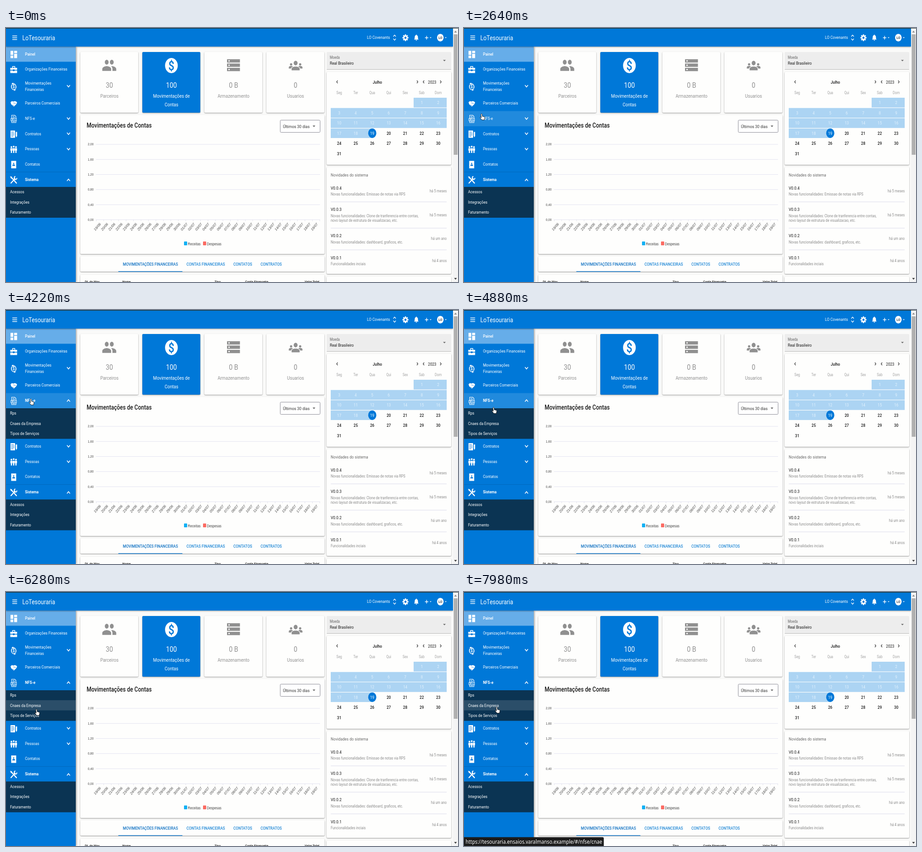
These frames come from a looping animation (998x561 px, 8 s). An HTML page:

```html
<!DOCTYPE html>
<html lang="pt-BR">
<head>
<meta charset="utf-8">
<title>Painel</title>
<style>
  html, body { margin: 0; width: 100%; height: 100%; overflow: hidden; background: #fafafa; }
  svg { display: block; width: 100%; height: 100%; }
  text { font-family: Roboto, sans-serif; white-space: pre; }
  .card { fill: #fefefd; filter: drop-shadow(0 1px 1.3px rgba(0, 0, 0, .42)); }
  .line { fill: none; stroke-linecap: round; stroke-linejoin: round; }
</style>
</head>
<body>
<svg id="stage" viewBox="0 0 998 561" preserveAspectRatio="none"></svg>
<script>
const SX = 0.86;            // the whole page is shown slightly narrowed
const LOOP = 8000;
const BLUE = '#0078d8', NAVY = '#0b3453', RANGE = '#acd4f3', GREY = '#909090', INK = '#161616';
const SIDE = 154, PANEL = 67.5;

// ---------- drawing helpers ----------
const rect = (x, y, w, h, fill, extra = '') =>
  `<rect x="${x}" y="${y}" width="${w}" height="${h}" fill="${fill}" ${extra}/>`;
const card = (x, y, w, h, extra = '') =>
  `<rect class="card" x="${x}" y="${y}" width="${w}" height="${h}" rx="2" ${extra}/>`;
const path = (d, fill = '#fff', extra = '') => `<path d="${d}" fill="${fill}" ${extra}/>`;
const line = (d, color = '#fff', w = 1.5) =>
  `<path class="line" d="${d}" stroke="${color}" stroke-width="${w}"/>`;
const oval = (x, y, rx, ry, fill) => `<ellipse cx="${x}" cy="${y}" rx="${rx}" ry="${ry}" fill="${fill}"/>`;
const at = (x, y, body, extra = '') => `<g transform="translate(${x} ${y}) ${extra}">${body}</g>`;

// text whose capitals are centred on y
function text(x, y, str, size, color = INK, { anchor = 'start', weight = 400, turn = 0, font = '', id = '' } = {}) {
  return `<text ${id && `id="${id}"`} transform="translate(${x} ${y}) scale(${SX} 1) rotate(${turn})" y="${size * 0.36}"` +
    ` font-size="${size}" font-weight="${weight}" fill="${color}" text-anchor="${anchor}"` +
    `${font && ` style="font-family:${font}"`}>${str}</text>`;
}
const mid = (x, y, str, size, color, weight = 400) => text(x, y, str, size, color, { anchor: 'middle', weight });
const end = (x, y, str, size, color, weight = 400) => text(x, y, str, size, color, { anchor: 'end', weight });
const caret = (x, y, color, r = 3) => path(`M${x - r} ${y - r / 2}h${2 * r}l${-r} ${r}z`, color);
const angle = (x, y, dir) => line(`M${x - dir} ${y - 2.6}l${2 * dir} 2.6 ${-2 * dir} 2.6`, INK, 1.2);
const chevron = (y, up) => line(up ? `M135 ${y + 2}l3-4 3 4` : `M135 ${y - 2}l3 4 3-4`);
const person = (x, y, s, fill) => at(x, y,
  oval(0, -5, 3, 3, fill) + path('M-6 6v-3c0-5 12-5 12 0v3z', fill), `scale(${s})`);

// ---------- sidebar icons, centred on 0,0 ----------
const icons = {
  board: path('M-7-8h6v9h-6zM-7 2.5h6v5.5h-6zM1-8h6.5v5h-6.5zM1-1.5h6.5v9.5h-6.5z'),
  brief: path('M-7.5-4h15v4.5h-5.5v-1h-4v1h-5.5zM-7.5 2h5.5v1.2h4v-1.2h5.5v5.5h-15z') +
    line('M-2.5-4.5v-2.5h5v2.5'),
  coin: line('M-1-6.5a6 7 0 0 1 5 11M1 7a6 7 0 0 1-5-11') +
    path('M-1-9v5l-4-2.5zM1 4.5v5l4-2.5z') + mid(0, 0, '$', 10, '#fff', 700),
  hands: path('M-7-3l3-2.5 3.5 1 2-1 3.500.5 2.500 2.500-1.500 4-2.500 2-3 3-2.500-2-3.500-3z') +
    line('M-1-2l2 1.5 2-1 3 3M-2 3l2 1.5', BLUE, .8),
  invoice: line('M-4.5-1v-7h6.500l3 3v4M-6-1h12v5.500h-12zM-4.500 4.500v4h9.500v-4M-2-5.500h3M-2-3.300h4.500M-2 6.500h4.500', '#fff', 1.1) +
    mid(0, 1.8, 'NF-e', 4.5, '#fff', 700),
  contract: path('M-7-8h10v16h-10z') + path('M4.5-5h3v9l-1.5 3-1.5-3z') +
    line('M-5-4.5h5M-5-1.5h6M-5 1.5h6M-5 4.5h4', BLUE, 1),
  people: [-5, 0, 5].map(x => oval(x, x ? -5 : -6, 1.9, 2.1, '#fff') +
    path(`M${x - 2.3} -2.5h4.6v5.5h-1v5h-2.6v-5h-1z`)).join(''),
  book: path('M-5.5-8h11v16.5h-11z') + person(0, 0, .48, BLUE),
  tools: line('M-5.5-6l11.5 13', '#fff', 2.4) + line('M-6 7l9-10', '#fff', 2.2) +
    line('M3-7.5a3 3.5 0 1 0 4 4', '#fff', 2) + path('M-8-8l4 1 1 4-3 0z'),
};
const item = (y, label, icon, weight = 400) =>
  at(17, y + 1, icons[icon]) + text(42, y, label, 9.5, '#fff', { weight });
const subMenu = (y, labels) => rect(0, y, SIDE, PANEL + .5, NAVY) +
  labels.map((s, i) => text(9, y + 11 + i * 22.5, s, 9.5, '#fff')).join('');

// ---------- page sections ----------
function header() {
  const gear = [...Array(8)].map((_, i) =>
    rect(-1.5, -7.5, 3, 4, '#fff', `transform="rotate(${i * 45})"`)).join('');
  return rect(0, 0, 987, 41, BLUE, 'style="filter:drop-shadow(0 1px 1.5px rgba(0,0,0,.4))"') +
    line('M14.5 17.5h9.5M14.5 21.5h9.5M14.5 25.5h9.5', '#fff', 1.4) +
    text(36, 21.5, 'LoTesouraria', 14.5, '#fff') +
    text(797, 21, 'LO Covenants', 9.6, '#fff') +
    line('M855.5 18.5l2.5-3 2.5 3M855.5 24l2.5 3 2.5-3', '#fff', 1.2) +
    at(882, 21.5, gear + oval(0, 0, 5.5, 5.5, '#fff') + oval(0, 0, 2.5, 2.5, BLUE), 'scale(.88 1)') +
    path('M901 25.5c1.5-1.5 1.2-3 1.4-5.5.2-2.8 1.7-4 2.8-4.2 0-1.6 1.6-1.6 1.6 0 1.1.2 2.6 1.4 2.8 4.2.2 2.5-.1 4 1.4 5.5zM904.5 26.3h3c-.2 2-2.8 2-3 0z') +
    line('M925.5 21.5h6.5M928.7 18v7', '#fff', 1.3) + caret(937.5, 21.5, '#fff', 2) +
    oval(959, 21.3, 7.2, 8.4, '#fff') + mid(959, 21.3, 'LO', 8, '#123', 500) + caret(971, 21.5, '#fff', 2) +
    rect(0, 0, 998, 1.3, '#22332f');
}

function scrollbar() {
  return rect(987, 1, 11, 560, '#f4f4f4') + rect(988.5, 14, 8.5, 266, '#b0b0b0') +
    path('M989.5 10l3-4 3 4z', '#8a8a8a') + path('M989.5 552l3 4 3-4z', '#444');
}

function tiles() {
  const data = [[164, '30', 'Parceiros'], [301, '100', 'Movimentações de', 'Contas'],
    [438, '0 B', 'Armazenamento'], [575, '0', 'Usuarios']];
  const boxes = data.map(([x, n, a, b], i) => {
    const c = i === 1 ? '#fff' : GREY, m = x + 64.3;
    return card(x, 53, 128, 134, i === 1 ? `style="fill:${BLUE}"` : '') +
      mid(m, 126, n, 16.5, c) + mid(m, 149.5, a, 11.1, c) + (b ? mid(m, 169, b, 11.1, c) : '');
  }).join('');
  const pair = path('M16 11c1.66 0 3-1.34 3-3s-1.34-3-3-3-3 1.34-3 3 1.34 3 3 3zM8 11c1.66 0 3-1.34 3-3s-1.34-3-3-3-3 1.34-3 3 1.34 3 3 3zM8 13c-2.33 0-7 1.17-7 3.5v2.5h14v-2.5c0-2.33-4.67-3.5-7-3.5zM16 13l-1 .05c1.2.85 2 2 2 3.45v2.5h6v-2.5c0-2.33-4.67-3.5-7-3.5z', GREY);
  const disks = [69, 78.5, 88].map(y => rect(488, y, 28.5, 7.3, GREY) + rect(491, y + 2.4, 3, 2.6, '#fff')).join('');
  const group = person(629.5, 84.5, .85, GREY) + person(649.5, 84.5, .85, GREY) +
    at(639.5, 83.5, oval(0, -6, 4.3, 5, GREY) +
      path('M-9.5 10.5v-4c0-7 19-7 19 0v4z', GREY, 'stroke="#fff" stroke-width="1.2"'));
  return boxes + at(211.2, 61.5, pair, 'scale(1.4 1.75)') +
    oval(365.2, 83, 14, 16.7, '#fff') + mid(365.2, 83, '$', 27, BLUE, 500) + disks + group;
}

function chart() {
  const arial = { anchor: 'end', font: "'Liberation Sans',Arial,sans-serif" };
  let s = card(164, 192, 539.5, 307) + text(178, 214.5, 'Movimentações de Contas', 14, INK, { weight: 500 }) +
    rect(605.5, 203.5, 88, 27, '#fff', 'rx="2" stroke="#8b8b96"') +
    text(611.5, 217, 'Últimos 30 dias', 9.9, '#333') + caret(680, 217, '#555');
  for (let i = 0; i < 6; i++) {
    const y = 257 + i * 33.3;
    s += line(`M199 ${y}H693`, '#e2e2f1', 1) +
      text(193.5, y - .5, (2 - i * .4).toFixed(2).replace('.', ','), 7.8, '#444', arial);
  }
  for (let i = 0; i <= 30; i++) {
    const july = i > 11, day = july ? i - 11 : 19 + i;
    s += text(208 + i * 15.97, 431.5, `${String(day).padStart(2, '0')}/0${july ? 7 : 6}`, 8.4, '#444', { ...arial, turn: -45 }) +
      rect(199 + i * 16.45, 423, .7, 4, '#dcdce8');
  }
  const key = { font: arial.font };
  return s + rect(393, 471.5, 7, 8.5, '#12b0f4', 'rx="1"') + text(401.5, 476.5, 'Receitas', 8.4, '#444', key) +
    rect(435, 471.5, 7, 8.5, '#fb6a62', 'rx="1"') + text(443.5, 476.5, 'Despesas', 8.4, '#444', key);
}

function table() {
  const tabs = [[258, 'MOVIMENTAÇÕES FINANCEIRAS'], [398.5, 'CONTAS FINANCEIRAS'], [502, 'CONTATOS'], [562, 'CONTRATOS']];
  const heads = [[174, 'Dt. da Mov.'], [257, 'Nome'], [460.5, 'Tipo'], [528, 'Conta Financeira'], [659.5, 'Valor Total']];
  return card(164, 504, 539.5, 34) +
    tabs.map(([x, s], i) => text(x, 522, s, 9.5, i ? '#1c86d6' : '#0b6fc2', { weight: 500 })).join('') +
    rect(248, 537, 141.5, 1.6, '#2483cf') + card(164, 545, 539.5, 40) +
    heads.map(([x, s]) => text(x, 560.5, s, 7.9, INK, { weight: 500 })).join('');
}

function calendar() {
  let s = rect(708, 53, 275, 38.5, '#ededed', 'rx="2"') + line('M708.5 91.5H982.5', '#aaa', .8) +
    text(715, 65.5, 'Moeda', 8.3, '#666') + text(715, 77, 'Real Brasileiro', 9.7) + caret(968, 72, '#666') +
    card(708, 97, 275, 205) + angle(731, 119, -1) + mid(820, 120, 'Julho', 9.5, INK, 500) + angle(908.5, 119, 1) +
    angle(922, 119, -1) + mid(941, 120, '2023', 9.5, INK) + angle(960, 119, 1) +
    rect(900, 154, 73, 21.5, RANGE) + rect(717, 176.7, 256, 21.5, RANGE) +
    rect(717, 199.3, 256, 21.5, RANGE) + rect(717, 222, 92, 21, RANGE) + oval(808.7, 232.3, 9, 10.6, BLUE);
  const col = i => 735.7 + i * 36.45;
  ['Seg', 'Ter', 'Qua', 'Qui', 'Sex', 'Sab', 'Dom'].forEach((d, i) => { s += mid(col(i), 142.5, d, 8.4, '#a0a0a0'); });
  for (let d = 1; d <= 31; d++) {
    const cell = d + 4;
    const color = d > 19 ? INK : d === 19 ? '#fff' : '#e2f1fd';
    s += mid(col(cell % 7), 165 + Math.floor(cell / 7) * 22.45, d, 9.5, color, d > 19 ? 500 : 400);
  }
  return s;
}

function news() {
  const list = [
    [353, 'há 5 meses', 360, 384, 'Novas funcionalidades: Emissao de notas via RPS'],
    [400.5, 'há 5 meses', 412.5, 442, 'Novas funcionalidades: Clone de tranferencia entre contas,', 'novo layout de estrutura de visualizacao, etc.'],
    [458.5, 'há um ano', 465, 490, 'Novas funcionalidades: dashboard, graficos, etc.'],
    [507, 'há 4 anos', 514, 0, 'Funcionalidades inciais'],
  ];
  return card(708, 307, 275, 236) + text(717, 324, 'Novidades do sistema', 9.7, '#666') +
    list.map(([y, when, wy, rule, a, b], i) => text(717, y, `V0.0.${4 - i}`, 9.8) +
      text(717, y + 14, a, 8.65, '#8a8a8a') + (b ? text(717, y + 24, b, 8.65, '#8a8a8a') : '') +
      end(973, wy, when, 8.6, '#8c8c8c') + (rule ? line(`M717.5 ${rule}H972.5`, '#dadaea', 1) : '')).join('') +
    card(708, 549, 275, 40);
}

function sidebar() {
  const fixed = rect(0, 41, SIDE, 520, BLUE, 'style="filter:drop-shadow(1px 0 2.2px rgba(0,0,0,.45))"') +
    rect(0, 41, SIDE, 33.5, '#66ade9') + item(57.5, 'Painel', 'board', 500) +
    item(91, 'Organizações Financeiras', 'brief') + at(17, 129.5, icons.coin) +
    text(42, 121.5, 'Movimentações', 9.5, '#fff') + text(42, 135.5, 'Financeiras', 9.5, '#fff') + chevron(128.5) +
    item(166, 'Parceiros Comerciais', 'hands');
  const invoice = at(17, 200.5, icons.invoice) + text(42, 199.5, 'NFS-e', 9.5, '#fff', { id: 'nfs' }) +
    `<g id="arrow">${chevron(0)}</g>`;
  const lower = item(233.5, 'Contratos', 'contract') + chevron(233.5) + item(267, 'Pessoas', 'people') + chevron(267.5) +
    item(300.5, 'Contatos', 'book') + rect(0, 317.5, SIDE, 1, '#0068bd') +
    item(334.5, 'Sistema', 'tools', 700) + chevron(335.5, true) + subMenu(351, ['Acessos', 'Integrações', 'Faturamento']);
  return fixed + '<g id="hovers"></g>' + invoice +
    `<clipPath id="fold"><rect id="foldBox" y="217" width="${SIDE}" height="0"/></clipPath>` +
    `<g clip-path="url(#fold)">${subMenu(217, ['Rps', 'Cnaes da Empresa', 'Tipos de Serviços'])}<g id="subHovers"></g></g>` +
    `<g id="lower">${lower}</g>`;
}

const outline = 'stroke="#111" stroke-width=".9"';
const hand = path('M3.2.7c1-.3 1.7.2 1.8 1.2l.3 4 3.8.9c1.3.4 1.8 1.2 1.6 2.6l-.8 4.6h-5.5l-3.6-4.5c-.7-1 .4-2 1.3-1.3l1.2 1-.9-6.800c-.1-.8.2-1.5.8-1.7z', '#fff', outline);
const pointer = path('M3.5.5v12.5l2.8-2.6 1.9 4.2 1.9-.9-1.9-4h3.6z', '#fff', outline);
const stage = document.getElementById('stage');
const $ = id => document.getElementById(id);
stage.innerHTML = rect(0, 0, 998, 561, '#fafaf9') + tiles() + chart() + table() + calendar() + news() +
  sidebar() + header() + scrollbar() +
  `<g id="bubble"><path id="bubbleBox" fill="#1b1b1b"/>${text(3.5, 551.5, '', 12.5, '#fff', { font: "'Noto Sans',sans-serif", id: 'url' })}</g>` +
  `<g id="cursor"><g id="hand">${hand}</g><g id="pointer">${pointer}</g></g>`;

// ---------- motion ----------
const clamp = v => Math.max(0, Math.min(1, v));
const mix = (a, b, k) => a + (b - a) * k;

// standard material curve, cubic-bezier(.4, 0, .2, 1)
function material(x) {
  x = clamp(x);
  let lo = 0, hi = 1;
  for (let i = 0; i < 20; i++) {
    const u = (lo + hi) / 2;
    if (1.2 * u * (1 - u) ** 2 + .6 * u * u * (1 - u) + u ** 3 < x) lo = u; else hi = u;
  }
  return 3 * lo * lo * (1 - lo) + lo ** 3;
}

// time, x, y of the cursor
const route = [[800, 900, 368], [1420, 121, 259], [1560, 42, 236], [2050, 34, 200], [2640, 35, 189], [3300, 42, 190],
  [3720, 50, 194], [4080, 50, 194], [4880, 61.5, 214.5], [5400, 63, 232], [6280, 63.5, 258.5], [6650, 65, 258],
  [6950, 67, 265], [7450, 68, 264], [7700, 68.5, 253.5], [LOOP, 68.5, 253.5]];

// from, to, top, height of each highlighted row
const rowHovers = [[1640, 1860, 217, 33.5], [1860, 4990, 183.5, 33.5]];
const subHovers = [[4990, 5640, 217, 22], [5640, 6800, 239, 22.5], [6800, 7560, 261.5, 23], [7560, 9000, 239, 22.5]];
const hoverRects = (id, list) => {
  $(id).innerHTML = list.map(([, , y, h]) => rect(0, y, SIDE, h, '#fff')).join('');
  return list.map((h, i) => [$(id).children[i], h]);
};
const hovers = [...hoverRects('hovers', rowHovers), ...hoverRects('subHovers', subHovers)];

function moveCursor(t) {
  const i = Math.max(0, route.findIndex(p => p[0] > t) - 1);
  const [t0, x0, y0] = route[i], [t1, x1, y1] = route[i + 1];
  const k = clamp((t - t0) / (t1 - t0)), e = i ? k * k * (3 - 2 * k) : 1 - (1 - k) ** 1.5;
  const x = mix(x0, x1, e);
  $('cursor').setAttribute('transform', `translate(${x} ${mix(y0, y1, e)})`);
  $('cursor').style.display = t < 820 ? 'none' : '';
  $('hand').style.display = x < 152 ? '' : 'none';
  $('pointer').style.display = x < 152 ? 'none' : '';
}

function showUrl(t) {
  $('bubble').style.opacity = clamp((t - 6980) / 120);
  $('url').textContent = 'https://tesouraria.ensaios.varalmanso.example/#/nfse/' + (t < 7660 ? 'servicos' : 'cnae');
  const w = $('url').getComputedTextLength() * SX + 7;
  $('bubbleBox').setAttribute('d', `M0 541.5h${w - 3}q3 0 3 3V561H0z`);
}

function render(t) {
  const open = PANEL * material((t - 3826) / 225);
  $('foldBox').setAttribute('height', open);
  $('lower').setAttribute('transform', `translate(0 ${open})`);
  $('arrow').setAttribute('transform', `translate(0 200) rotate(${180 * material((t - 3790) / 225)} 138 0)`);
  $('nfs').setAttribute('font-weight', t < 3790 ? 400 : 700);
  for (const [el, [from, to]] of hovers)
    el.setAttribute('opacity', .13 * clamp((t - from) / 120) * clamp((to + 120 - t) / 120));
  moveCursor(t);
  showUrl(t);
}

const start = performance.now();
function tick() {
  render((performance.now() - start) % LOOP);
  requestAnimationFrame(tick);
}
tick();
</script>
</body>
</html>
```
